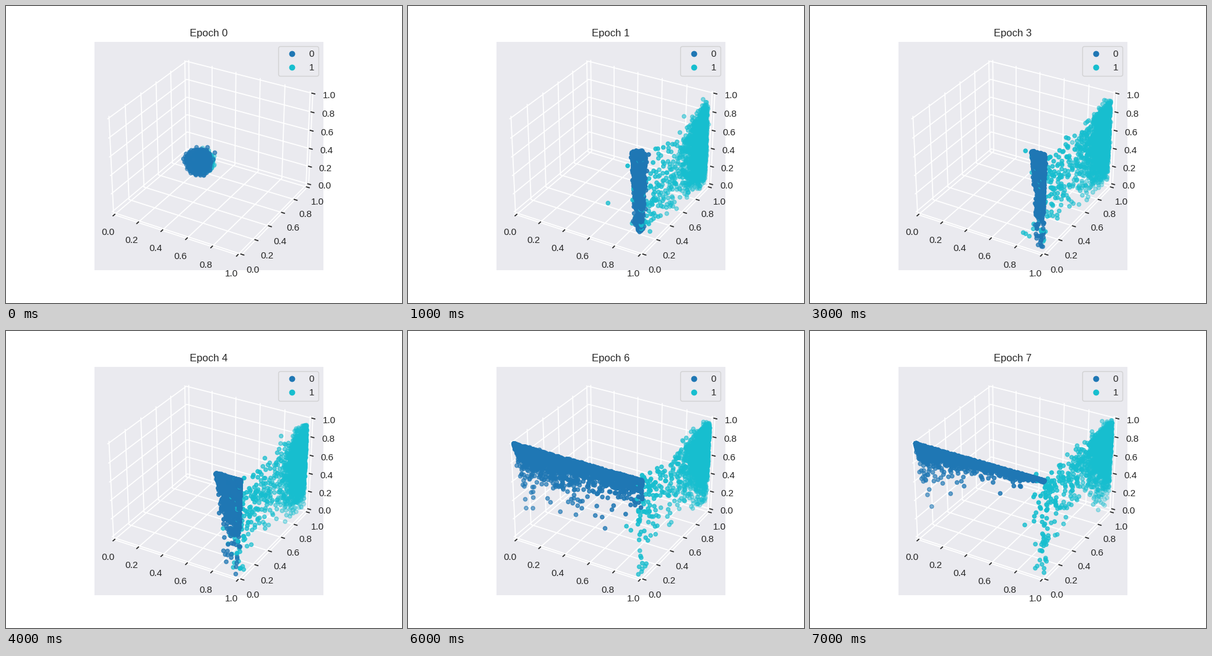
Recreate the animation shown at these times as a matplotlib script. Size 640 by 480 pixels, loop 8 s.

```python
import numpy as np
import matplotlib.pyplot as plt
from matplotlib.animation import FuncAnimation
from matplotlib.lines import Line2D

INK = "0.15"
BLUE, CYAN = "#1f77b4", "#17becf"
COUNT = 2000

plt.rcParams.update({
    "font.family": "Liberation Sans", "text.color": INK,
    "mathtext.fontset": "custom", "mathtext.rm": "Liberation Sans",
    "axes.facecolor": "#EAEAEF", "axes.edgecolor": "white",
    "axes.linewidth": 1.25, "axes.titlesize": 12,
    "grid.color": "white", "grid.linewidth": 1.25, "grid.linestyle": "-",
    "lines.linewidth": 1.5, "lines.solid_capstyle": "round",
    "xtick.labelsize": 11, "ytick.labelsize": 11,
    "xtick.color": INK, "ytick.color": INK,
    "xtick.major.width": 1.25, "ytick.major.width": 1.25,
    "legend.fontsize": 11,
})


def ball(rng, center, radii):
    return center + radii * rng.standard_normal((COUNT, 3)).clip(-2.6, 2.6)


def blue_cloud(rng, epoch):
    """Points on the front wall, spreading left along its upper edge."""
    ease = 1 / (1 + np.exp(-2.6 * (epoch - 4.85)))
    reach = min(1, 0.09 + 0.96 * ease)
    far = rng.beta(0.95, 3 - 0.37 * epoch, COUNT)
    depth = 0.3 - 0.042 * epoch + 0.06 * ease * far
    slope = 2 + 12 * max(0, epoch - 5)
    taper = np.minimum(1, 0.03 + slope * (1 - far))
    heavy = np.where(rng.random(COUNT) < 0.03, 3.5, 1)
    drop = rng.exponential(depth * taper * heavy)
    floor = 0.2 / epoch ** 2
    y = rng.exponential(0.012 / epoch, COUNT)
    return np.column_stack([1 - reach * far, y, 1 - drop % (1 - floor)])


def cyan_cloud(rng, epoch):
    """Points on the right wall, dense at the back and rising."""
    wide = rng.random(COUNT) < 0.12
    near_back = 0.965 + 0.005 * epoch - rng.exponential(0.1, COUNT)
    y = np.where(wide, rng.random(COUNT) ** 1.6, near_back.clip(0.01))
    logit = 0.2 * epoch - 0.35 + 0.95 * rng.standard_normal(COUNT)
    column = wide & (y < 0.08)
    z = np.where(column, rng.uniform(0.2 / epoch ** 2, 1, COUNT),
                 1 / (1 + np.exp(-logit)))
    x = 1 - rng.exponential(0.01 + 0.025 * (1 - y))
    return np.column_stack([x, y, z])


def cloud(epoch):
    rng = np.random.default_rng(40 + epoch)
    if epoch == 0:
        blue = ball(rng, (.43, .43, .425), (.034, .034, .046))
        cyan = ball(rng, (.432, .49, .388), (.028, .028, .034))
    else:
        blue, cyan = blue_cloud(rng, epoch), cyan_cloud(rng, epoch)
    return np.vstack([blue, cyan]), [BLUE] * COUNT + [CYAN] * COUNT


fig = plt.figure(figsize=(6.4, 4.8), dpi=100, facecolor="white")
ax = fig.add_subplot(projection="3d")
margin = 1 / 48
limits = (-margin, 1 + margin)
for axis in (ax.xaxis, ax.yaxis, ax.zaxis):
    axis.set_ticks(np.linspace(0, 1, 6))
    axis.set_pane_color((0, 0, 0, 0))
ax.legend(handles=[Line2D([], [], ls="", marker="o", color=color,
                          label=rf"$\mathdefault{{{label}}}$")
                   for label, color in enumerate((BLUE, CYAN))],
          loc="upper right")
dots = None


def update(epoch):
    global dots
    if dots is not None:
        dots.remove()
    points, colors = cloud(epoch)
    dots = ax.scatter(*points.T, c=colors)
    ax.set(xlim=limits, ylim=limits, zlim=limits)
    ax.set_title(f"Epoch {epoch}")


anim = FuncAnimation(fig, update, frames=8, init_func=lambda: None,
                     interval=1000, repeat=True, repeat_delay=0)
plt.show()
```
